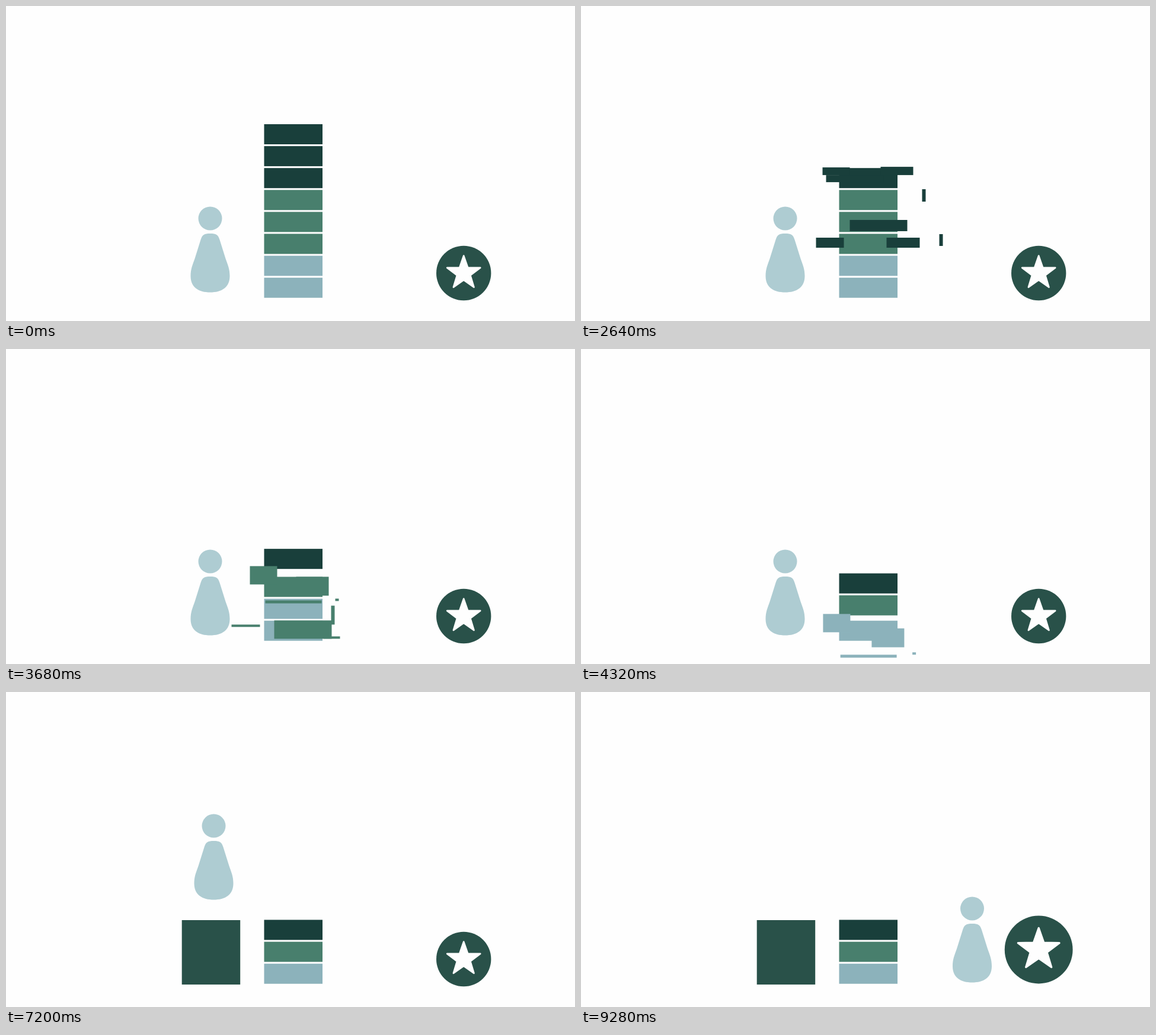
An HTML page with a canvas for the animation above (9.92 s loop, 960 by 533 pixels).

```html
<!DOCTYPE html>
<html lang="en">
<head>
<meta charset="utf-8">
<title>Tower and star</title>
<style>
  html, body { margin: 0; width: 960px; height: 533px; overflow: hidden; background: #fefefe; }
  canvas { display: block; }
</style>
</head>
<body>
<canvas id="stage" width="960" height="533"></canvas>
<script>
const ctx = document.getElementById('stage').getContext('2d');
const LOOP = 9920, STEP = 80;
const PALE = '#aeccd2', PINE = '#295149', DARK = '#193f3b', GREEN = '#487f6d', BLUE = '#8cb2bb';
const ROWS = [DARK, DARK, DARK, GREEN, GREEN, GREEN, BLUE, BLUE];
const PITCH = 37.1, TOP = 200, LEFT = 435.5, WIDE = 98.5, TALL = 34;

// Each piece: start x, y, w, h, then x, y, w, h after `span` ms; y counts from the row's top.
const shatter = [
  [0, 0, 46, 34, -24, 19, 46, 31],
  [47, 0, 52, 34, 54, 37, 55, 32],
  [1, 27, 97, 7, 2, 77, 95, 5],
  [92, 27, 6, 6, 120, 74, 6, 4]
];
const bursts = [
  { row: 0, start: 1790, span: 850, pieces: [
    [1, 0, 97, 17, 18, 162, 97, 19],
    [0, 17, 47, 17, -39, 192, 47, 17],
    [47, 17, 52, 17, 80, 192, 56, 17],
    [92, 0, 6, 17, 140, 110, 6, 21],
    [92, 17, 6, 17, 169, 186, 6, 20]] },
  { row: 1, start: 2290, span: 350, pieces: [
    [0, 0, 46, 17, -28, 36, 46, 13],
    [47, 0, 52, 17, 70, 35, 55, 14],
    [0, 17, 97, 17, -22, 49, 97, 12]] },
  { row: 3, start: 2915, span: 765, pieces: [
    [1, 0, 97, 34, 17, 148, 97, 31],
    [0, 0, 48, 17, -55, 155, 48, 4],
    [92, 0, 6, 34, 113, 123, 6, 32],
    [70, 17, 28, 17, 100, 175, 28, 4]] },
  { row: 4, start: 3405, span: 275, pieces: shatter },
  { row: 6, start: 4000, span: 275, pieces: shatter }
];

const person = new Path2D('M0 45.5C10 45.5 13 47 16 56L26 88C30 99 33 106 33 117.5C33 137 19 145 0 145' +
  'C-19 145-33 137-33 117.5C-33 106-30 99-26 88L-16 56C-13 47-10 45.5 0 45.5Z');
person.arc(0, 20, 20, 0, 7);

const star = new Path2D();
for (let i = 0; i < 10; i++) {
  const r = i % 2 ? 11.8 : 29.5, a = i * Math.PI / 5;
  star.lineTo(r * Math.sin(a), -r * Math.cos(a));
}
star.closePath();

const clamp = v => Math.max(0, Math.min(1, v));
const mix = (a, b, k) => a + (b - a) * k;

function box(color, x, y, w, h) {
  ctx.fillStyle = color;
  ctx.fillRect(x, y, w, h);
}

function drawTower(t) {
  ROWS.forEach((color, row) => {
    if (bursts.some(b => b.row === row && t >= b.start)) return;
    const fall = bursts.reduce((sum, b) => sum + (b.row > row ? clamp((t - b.start) / 380) : 0), 0);
    box(color, LEFT, TOP + PITCH * (row + fall), WIDE, TALL);
  });
  for (const { row, start, span, pieces } of bursts) {
    const k = (t - start) / span;
    if (k < 0 || t > 4720) continue;
    const size = clamp(k);
    for (const [x, y, w, h, x1, y1, w1, h1] of pieces)
      box(ROWS[row], LEFT + mix(x, x1, k ** 0.8), TOP + PITCH * row + mix(y, y1, k * k),
        mix(w, w1, size), mix(h, h1, size));
  }
}

// Centre x and head top of the person
function place(t) {
  if (t < 7120) return [344.5, 339.5 - 114.5 * clamp((t - 5701) / 539)];
  if (t < 7760) {
    const u = (t - 7120) / 640;
    return [mix(344.5, 484.5, u * u * (3 - 2 * u)), 225 - 27 * (1 - (1 - 2 * u) ** 4)];
  }
  const u = clamp((t - 7760) / 1360);
  return [mix(484.5, 660, u ** 1.33), 209 + 244.4 * (u - 0.25) ** 2];
}

function drawStar(t) {
  const k = clamp((t - 8880) / 400), s = mix(1, 1.243, k);
  ctx.save();
  ctx.translate(772.2, mix(452, 436, k));
  ctx.scale(s, s);
  ctx.fillStyle = PINE;
  ctx.beginPath();
  ctx.arc(0, 0, 46.2, 0, 7);
  ctx.fill();
  ctx.fillStyle = ctx.strokeStyle = '#fefefe';
  ctx.lineWidth = 2.6;
  ctx.lineJoin = 'round';
  ctx.fill(star);
  ctx.stroke(star);
  ctx.restore();
}

function draw(t) {
  box('#fefefe', 0, 0, 960, 533);
  const rise = 109 * clamp((t - 5684) / 556);
  box(PINE, 296.7, 495 - rise, 98.5, rise);
  drawTower(t);
  drawStar(t);
  ctx.save();
  ctx.translate(...place(t));
  ctx.fillStyle = PALE;
  ctx.fill(person);
  ctx.restore();
}

const begin = performance.now();
function tick() {
  const t = (performance.now() - begin) % LOOP;
  draw(Math.floor(t / STEP) * STEP);
  requestAnimationFrame(tick);
}
tick();
</script>
</body>
</html>
```
